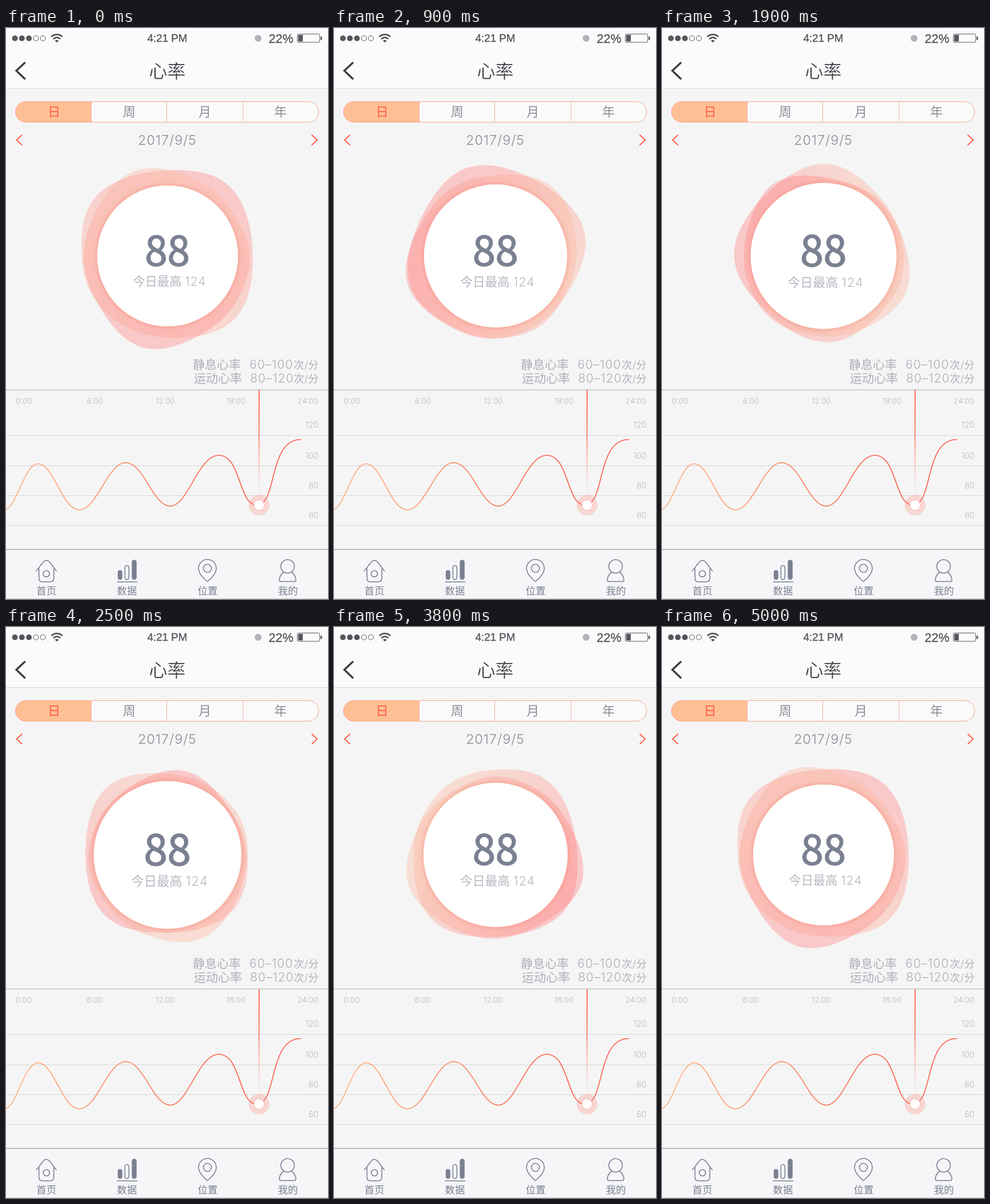
An HTML page that plays this animation: 562x997 px, repeating every 5100 ms.

```html
<!DOCTYPE html>
<html lang="zh-CN">
<head>
<meta charset="utf-8">
<title>心率</title>
<style>
  html, body { margin: 0; height: 100%; overflow: hidden; background: #f5f5f5; }
  svg { display: block; width: 100vw; height: 100vh; }
  text { font-family: Inter, "Noto Sans CJK SC", "Noto Sans CJK", sans-serif; font-weight: 300; }
  .status { font-family: "Liberation Sans", sans-serif; font-weight: 400; fill: #55565a; stroke: #55565a; stroke-width: .4; }
  .mid { text-anchor: middle; }
  .end { text-anchor: end; }
  .wide { letter-spacing: 1px; }
  .title { font-size: 32px; fill: #3a3b3f; stroke: #fafbfd; stroke-width: .4; }
  .tab { font-size: 22px; fill: #8b8d98; }
  .beat { font: 400 70.5px "Noto Sans CJK SC", "Noto Sans CJK", sans-serif; fill: #7b8092; stroke: #7b8092; stroke-width: 1.5; }
  .range { font-size: 21px; fill: #adafba; }
  .unit { font-size: 18px; letter-spacing: .5px; }
  .axis { font-size: 13.3px; fill: #b6b7c0; }
  .level { font-size: 14.2px; fill: #b6b7c0; text-anchor: end; }
  .nav { font-size: 17.5px; fill: #7b8092; }
  .icon { fill: none; stroke: #7b8092; stroke-width: 1.6; stroke-linecap: round; stroke-linejoin: round; }
  .solid { fill: #7b8092; stroke: none; }
</style>
</head>
<body>
<svg viewBox="0 0 562 997" preserveAspectRatio="none">
  <defs>
    <linearGradient id="tint" gradientUnits="userSpaceOnUse" x1="150" x2="-150">
      <stop stop-color="#ff8484"/><stop offset="1" stop-color="#fbbba2"/>
    </linearGradient>
    <linearGradient id="tintUp" href="#tint" gradientTransform="rotate(-60)"/>
    <linearGradient id="tintDown" href="#tint" gradientTransform="rotate(105)"/>
    <linearGradient id="wave" gradientUnits="userSpaceOnUse" x1="0" x2="400">
      <stop stop-color="#ffb47c"/><stop offset="1" stop-color="#fb5b48"/>
    </linearGradient>
    <linearGradient id="beam" x2="0" y2="1">
      <stop stop-color="#fa5f4a"/><stop offset=".4" stop-color="#fa7a66"/>
      <stop offset="1" stop-color="#fbb5a8" stop-opacity="0"/>
    </linearGradient>
    <filter id="glow" x="-20%" y="-20%" width="140%" height="140%">
      <feDropShadow dx="0" dy="0" stdDeviation="4" flood-color="#f27a60" flood-opacity=".65"/>
    </filter>
    <clipPath id="pill"><rect x="16.5" y="128.5" width="529" height="36" rx="18"/></clipPath>
  </defs>

  <!-- status bar and title -->
  <rect width="562" height="997" fill="#f5f5f5"/>
  <rect width="562" height="105" fill="#fafbfd"/>
  <path d="M0 105.5H562" stroke="#d3d5d9"/>
  <g fill="#55565a">
    <circle cx="15.5" cy="18" r="5"/><circle cx="27.7" cy="18" r="5"/><circle cx="40" cy="18" r="5"/>
  </g>
  <g fill="none" stroke="#55565a">
    <circle cx="52.2" cy="18" r="4.5"/><circle cx="64.4" cy="18" r="4.5"/>
    <path d="M79 15.3a14.2 14.2 0 0 1 19.5 0M82.7 19.2a8.6 8.6 0 0 1 12.1 0" stroke-width="2.7"/>
    <rect x="508.5" y="10.5" width="39" height="14.5" rx="2"/>
  </g>
  <path d="M85.5 22.2a4.7 4.7 0 0 1 6.5 0L88.75 25.5ZM510 12h8v11.500h-8ZM549 15h1.500q1 0 1 1v4q0 1-1 1H549Z" fill="#55565a"/>
  <circle cx="440" cy="18" r="6" fill="#b3b4b8"/>
  <text class="status mid" x="281.5" y="24" font-size="18.7">4:21 PM</text>
  <text class="status" x="458.5" y="25.5" font-size="21.5">22%</text>
  <path d="M33.5 60 18 74.5 33.5 89.5" fill="none" stroke="#3a3b3f" stroke-width="3.3"/>
  <text class="title mid" x="281.5" y="86.5">心率</text>

  <!-- period switch and date -->
  <g clip-path="url(#pill)">
    <rect x="16" y="128" width="530" height="37" fill="#fafafb"/>
    <rect x="16" y="128" width="133" height="37" fill="#ffbf94"/>
  </g>
  <rect x="16.5" y="128.5" width="529" height="36" rx="18" fill="none" stroke="#f9a58f"/>
  <path d="M149 128.5v36M280.5 128.5v36M413.5 128.5v36" stroke="#f9b8a5"/>
  <text class="tab mid" x="84" y="154" style="fill:#ff5d47">日</text>
  <text class="tab mid" x="215" y="154">周</text>
  <text class="tab mid" x="347" y="154">月</text>
  <text class="tab mid" x="479" y="154">年</text>
  <path d="M28 186.5 18.5 195.5 28 204.5M533.5 186.5 543 195.5 533.5 204.5" fill="none" stroke="#ff5f47" stroke-width="1.9"/>
  <text class="wide mid" x="281.5" y="203.5" font-size="23.3" fill="#898b97">2017/9/5</text>

  <!-- pulse -->
  <path id="rose" fill="url(#tintUp)" opacity=".4"/>
  <path id="peach" fill="url(#tintDown)" opacity=".4"/>
  <g id="dial">
    <circle r="123" fill="#fff" filter="url(#glow)"/>
    <text class="beat mid" x="-.3" y="17">88</text>
    <text class="mid" x="3.5" y="52" font-size="21.2" fill="#b6b8c2">今日最高 <tspan class="wide">124</tspan></text>
  </g>

  <g class="range">
    <text x="326" y="595">静息心率</text><text class="wide" x="425" y="595">60–100</text>
    <text class="unit end" x="546" y="595">次/分</text>
    <text x="328" y="618.5">运动心率</text><text class="wide" x="426" y="618.5">80–120</text>
    <text class="unit end" x="546" y="618.5">次/分</text>
  </g>

  <!-- chart -->
  <path d="M0 632H562" stroke="#c3c4c9" stroke-width="1.6"/>
  <path d="M0 711.5H562M0 764.5H562M0 816.5H562M0 868.5H562" stroke="#d6d7da"/>
  <g class="axis">
    <text x="17" y="656">0:00</text><text x="141" y="656">6:00</text>
    <text x="261" y="656">12:00</text><text x="384.5" y="656">18:00</text>
    <text class="end" x="545" y="656">24:00</text>
  </g>
  <g class="level">
    <text x="545.5" y="698">120</text><text x="545.5" y="752">100</text>
    <text x="545.5" y="804">80</text><text x="545.5" y="856">60</text>
  </g>
  <path d="M0 841C20 833 32 761 56 761C84 761 98 841.5 128 841.5C159 841.5 177 759 209 759C241 759 256 835 287 835C317 835 336 746 371 746C411 746 405 833 438 833C474 833 457 718.5 515 718.5" fill="none" stroke="url(#wave)" stroke-width="1.6"/>
  <rect x="440.8" y="632" width="1.8" height="192" fill="url(#beam)"/>
  <circle cx="441.6" cy="833" r="18" fill="#ff7d68" opacity=".25"/>
  <circle cx="441.6" cy="833" r="9.2" fill="#fff" stroke="#f0a898" stroke-width=".8"/>

  <!-- navigation -->
  <rect y="910" width="562" height="87" fill="#f6f6f9"/>
  <path d="M0 910.5H562" stroke="#a6a8b2" stroke-width="1.5"/>
  <path d="M0 996.5H562" stroke="#c9cacd"/>
  <g class="icon">
    <path d="M53 948 65 932.5Q70.5 926.5 76 932.5L88 948M57.5 944v17q0 6 6 6h14q6 0 6-6v-17"/>
    <circle cx="70.5" cy="953" r="5.5"/>
    <rect class="solid" x="195" y="946.5" width="8" height="17" rx="4"/>
    <rect x="207.5" y="938.5" width="7" height="24.5" rx="3.5"/>
    <rect class="solid" x="219.5" y="928.5" width="8.5" height="35" rx="4.2"/>
    <path d="M194 967.3h35"/>
    <path d="M351.5 966.5C341 958 336 951 336 943.5a15.5 15.5 0 0 1 31 0C367 951 362 958 351.5 966.5Z"/>
    <circle cx="351.5" cy="943.5" r="7"/>
    <circle cx="491.5" cy="940" r="11.8"/>
    <path d="M484.5 950Q478 955 477 963Q477 966.5 480 966.5H503Q506 966.5 506 963Q505 955 498.5 950"/>
  </g>
  <g class="nav mid">
    <text x="70.5" y="988.5">首页</text><text x="211" y="988.5">数据</text>
    <text x="352" y="988.5">位置</text><text x="492" y="988.5">我的</text>
  </g>
</svg>
<script>
const $ = id => document.getElementById(id);

// Closed smooth curve through [angle in degrees, radius] knots.
function blob(knots) {
  const pts = knots.map(([a, r]) => [r * Math.cos(a * Math.PI / 180), r * Math.sin(a * Math.PI / 180)]);
  const at = i => pts[(i + pts.length) % pts.length];
  const handle = (i, sign) => at(i).map((v, c) => v + sign * (at(i + 1)[c] - at(i - 1)[c]) / 5.35);
  return 'M' + pts[0] + pts.map((_, i) =>
    'C' + [handle(i, 1), handle(i + 1, -1), at(i + 1)].join(' ')).join('') + 'Z';
}

$('rose').setAttribute('d', blob([[-140, 159.5], [-94, 146], [-48, 161], [0, 149.5],
  [46, 163.5], [95, 145], [140, 147.5], [180, 149]]));
$('peach').setAttribute('d', blob([[-165, 146], [-114, 162], [-70, 147], [-25, 140.5],
  [12, 143.5], [56, 144], [104, 161.5], [150, 144]]));

const STEP = 100, LOOP = 5100, LAST = 49;

function place(id, x, y, turn, size) {
  $(id).setAttribute('transform', `translate(${x} ${y}) rotate(${turn}) scale(${size})`);
}

function draw(now) {
  const step = Math.max(0, Math.floor(now % LOOP / STEP) - 1);
  const u = step / LAST;
  const swell = 0.049 * (1 - Math.abs(2 * u - 1));
  place('rose', 281, 395, -360 * u, 1 - swell);
  place('peach', 281, 402, 360 * u, 1 - swell);
  place('dial', 282, 398, 0, 1 + swell);
}

let start;
function tick(now) {
  start ??= now;
  draw(now - start);
  requestAnimationFrame(tick);
}
draw(0);
requestAnimationFrame(tick);
</script>
</body>
</html>
```
